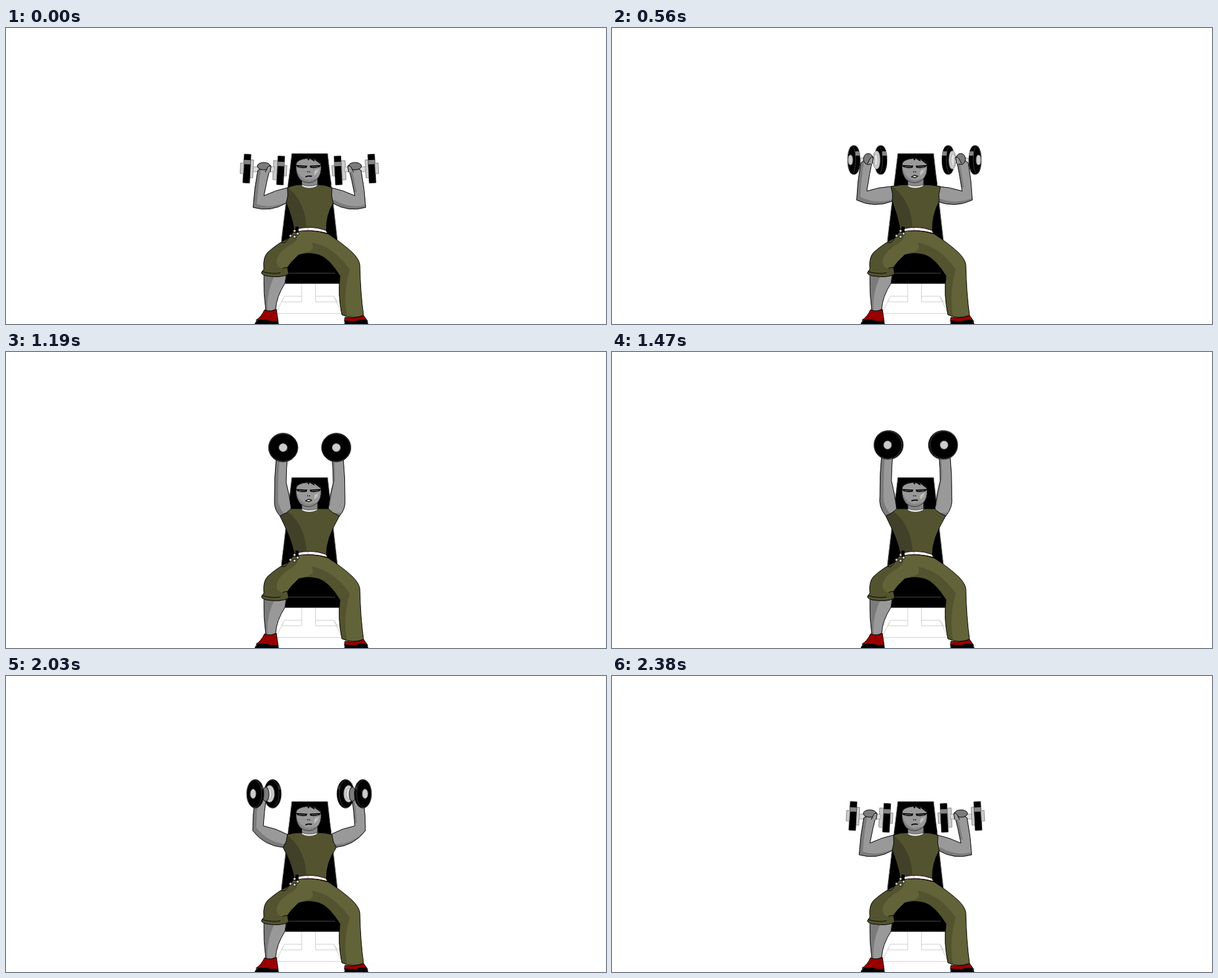
These frames come from a looping animation (970x480 px, 2.8 s). An HTML page with a canvas:

```html
<!DOCTYPE html>
<html lang="en">
<head>
<meta charset="utf-8">
<title>Seated dumbbell press</title>
<style>
html, body { margin: 0; width: 100%; height: 100%; overflow: hidden; background: #fff; }
canvas { display: block; width: 970px; height: 480px; }
</style>
</head>
<body>
<canvas id="stage" width="970" height="480"></canvas>
<script>
const c = document.getElementById('stage').getContext('2d');
const LOOP = 2800, STEP = 70, HOLD = 350, LAST = 29;

const SKIN = '#999', SKIN_DARK = '#7b7b7b';
const SHIRT = '#535330', SHIRT_DARK = '#414129';
const PANTS = '#636339', PANTS_DARK = '#535330';
const RED = '#990000';

// step, mirror axis, plate gap, plate width, front plate x, y, then the arm:
// shoulder, inner elbow, inner wrist, outer wrist, outer elbow, armpit
const rest = [0, 490.5, 54.5, 11, 389.5, 228, 455, 259, 417, 272, 428, 223, 407, 231, 399.5, 291, 453, 284];
const poses = [
  rest,
  [3, 489, 43.5, 20, 391, 214, 451, 257, 412, 264.5, 422, 209, 402, 219, 395.5, 279, 453, 281],
  [8, 492, 27.5, 29, 415.5, 177, 453, 254, 430, 224, 435, 182, 414, 190, 412, 236, 443, 276],
  [12, 491, 0, 47, 448, 155, 461, 254, 453, 212, 455, 170, 437, 170, 434, 240, 443, 266],
  [15, 491, 0, 47, 449, 149, 461, 254, 454, 208, 456, 164, 438, 164, 435, 236, 443, 265],
  [20, 492, 17, 33, 426.5, 165.5, 456, 255, 438, 218, 441, 178, 423, 180, 421, 226, 441, 271],
  [24, 490, 28, 28, 403, 191, 455, 257, 416, 243, 421, 196, 402, 204, 399, 251, 448, 278],
  rest.map((v, i) => i === 0 ? LAST : i > 4 && i % 2 ? v - 1 : v)
];

// cubic blend through the poses
function slope(n, i) {
  const a = poses[n - 1], b = poses[n + 1];
  return a && b ? (b[i] - a[i]) / (b[0] - a[0]) : 0;
}
function poseAt(k) {
  let n = 0;
  while (n < poses.length - 2 && k >= poses[n + 1][0]) n++;
  const a = poses[n], b = poses[n + 1], d = b[0] - a[0];
  const t = (k - a[0]) / d, t2 = t * t, t3 = t2 * t;
  return a.map((v, i) =>
    v * (2 * t3 - 3 * t2 + 1) + b[i] * (3 * t2 - 2 * t3) +
    d * (slope(n, i) * (t3 - 2 * t2 + t) + slope(n + 1, i) * (t3 - t2)));
}

function paint(path, fill, stroke, width = 1) {
  if (typeof path === 'string') path = new Path2D(path);
  if (fill) { c.fillStyle = fill; c.fill(path); }
  if (stroke) { c.strokeStyle = stroke; c.lineWidth = width; c.stroke(path); }
}
function clipped(path, draw) {
  c.save();
  c.clip(path);
  draw();
  c.restore();
}
function oval(x, y, rx, ry, fill, stroke, width) {
  const p = new Path2D();
  p.ellipse(x, y, rx, ry, 0, 0, 7);
  paint(p, fill, stroke, width);
}
// box whose corners grow until it is an ellipse
function softBox(x, y, rx, ry, round) {
  const p = new Path2D();
  p.roundRect(x - rx, y - ry, rx * 2, ry * 2, { x: rx * round, y: ry * round });
  return p;
}

function drawBench() {
  paint('M478 414V444H446L450 435H478M448 439L436 463H543L530 435H500.5M500.5 414V444H536L530 435', null, '#ccc');
  paint('M462 203.5H520L536 346H445Z', '#000', '#888');
  paint('M462 362H516L541 398L539 414.5H451L455 390Z', '#000', '#555');
  paint('M453 397.5H532', null, '#444');
}

function drawHead(open) {
  paint('M464 210Q490 199 518 210L526 254Q490 258 456 254Z', '#000');
  paint('M478 243H504V255Q490 262 478 255Z', '#888', '#000');
  const face = new Path2D('M469 222Q469 213 488 211.5Q508 212 509 222Q511 237 502 246Q489 256 476 246Q468 237 469 222Z');
  paint(face, SKIN);
  clipped(face, () => {
    paint('M466 230L471 231Q475 243 489 247L503 244L495 256H466Z', '#848484');
    paint('M474 209L487 212L489 215L491 212L499 216.5L498 213L510 222V206Z', '#000');
  });
  paint(face, null, '#222', .8);
  paint('M468 222.3L487 223.3L486 226.5Q479 228 472 226ZM491 223.3L510 222.3L506 226Q498 228 492 226.5Z', '#000');
  paint('M473 225H484M494 225H505', null, '#999', .8);
  paint('M487 233.3h1.5M490 233.3h1.5', null, '#000', 1.5);
  paint('M498 239L499 232L506 228L504 235Z', '#c4c4c4');
  paint('M500 240L505 230', null, SKIN, 1);
  if (open) paint('M484 241.5L489 238.7L494.5 240.3L490 242.8Z', '#ddd', '#000', 1.2);
  else paint('M484 241.5Q488 239.5 494.5 240.5', null, '#000', 1.8);
}

function drawPlate(x, y, g, front) {
  const { w, u, round } = g, left = x - w / 2;
  const turn = Math.pow(1 - u, 1.6), rim = Math.min(w, 12 * turn);
  const near = Math.min(1, u * 4), bulge = 12 * near * (1 - near);
  c.save();
  c.translate(x, y);
  c.rotate(.05 * (1 - near));
  c.translate(-x, -y);
  // collar on the far side
  if (u < .25) {
    paint(softBox(x + (front ? 7 : 6.5) * (1 - u * 2), y, 3.2, front ? 14.5 : 8.5, round * .6), '#ccc', '#888');
  }
  const body = softBox(x, y, w / 2, 23.3, round);
  paint(body, '#000', '#222', .7);
  clipped(body, () => {
    const band = new Path2D();
    band.rect(left + w - rim, y - 14, rim, 7);
    paint(band, u < .35 ? '#858585' : '#333');
  });
  if (round > .5) paint(softBox(left + (w - rim) / 2 + .5, y, (w - rim) / 2, 22.3, 1), null, '#555', .7);
  if (front) {
    const hx = x - 8 * Math.pow(1 - u, 1.3) - bulge;
    paint(softBox(hx, y, 2.6 + 4 * u + bulge / 3, 8.5 - 2 * u, round), '#ccc', '#888');
  } else {
    const hx = x - 9 * (1 - u), rx = Math.min(8, 3 + 10 * u), ry = 15.5 - 4 * u;
    paint(softBox(hx, y, rx, ry, round), '#ccc', '#888');
    if (u > .15) paint(softBox(hx - 1, y, rx * .6, ry * .65, round), '#e2e2e2', '#999', .8);
  }
  c.restore();
}

function armPath(p) {
  const [sx, sy, ix, iy, wx, wy, vx, vy, ex, ey, ax, ay] = p.slice(6);
  const a = new Path2D();
  a.moveTo(sx + 14, sy + 4);
  a.lineTo(sx, sy);
  a.quadraticCurveTo((sx + ix) / 2 + 1, (sy + iy) / 2 - 3, ix, iy);
  a.quadraticCurveTo((ix + wx) / 2 - 1, (iy + wy) / 2, wx, wy);
  a.quadraticCurveTo((wx + vx) / 2 + 4, wy - 2, vx, vy);
  a.quadraticCurveTo((vx + ex) / 2 - 2, (vy + ey) / 2, ex, ey);
  a.quadraticCurveTo((ex + ax) / 2 - (ay - ey) * .22, (ey + ay) / 2 + (ax - ex) * .22, ax, ay);
  a.lineTo(ax + 16, ay);
  a.closePath();
  return a;
}

function drawFist(x, y, near, wx, wy) {
  oval(x, y, 10.5 - 5.5 * near, 6 + 6 * near, SKIN_DARK, '#000');
  if (near > .8) return;
  const thumb = new Path2D();
  thumb.moveTo(wx - 1, wy + 11);
  thumb.lineTo(wx + .5, wy + 1);
  thumb.quadraticCurveTo(wx - 3, wy - 1, wx - 5, wy + 3);
  thumb.lineTo(wx - 9, wy + 11);
  paint(thumb, SKIN, '#000');
}

function drawArm(p, shade) {
  const [, , gap, width, x, y] = p, w = Math.min(47, width);
  const u = Math.max(0, (w - 11) / 36);
  const g = { w, u, round: Math.min(1, .04 + u * 3.4) };
  const drop = 3 * Math.max(0, 1 - u * 4), near = Math.min(1, u * 2);

  drawPlate(x + Math.max(0, gap), y + drop, g, false);
  if (u < .4) {
    const bar = new Path2D();
    bar.rect(x + 10, y - 3, gap - 20, 8);
    paint(bar, '#ddd', '#999');
  }
  const arm = armPath(p);
  paint(arm, SKIN_DARK);
  clipped(arm, () => {
    c.translate(shade, -5);
    paint(arm, SKIN);
  });
  paint(arm, null, '#000');
  drawFist(x + gap / 2 + 3 * near, y - 4 + 5 * near, near, p[10], p[11]);
  drawPlate(x, y, g, true);
}

function drawShirt(p) {
  const m = 982, [sx, sy] = p.slice(6, 8), [ax, ay] = p.slice(16);
  const hole = (sx + ax) / 2 + 3, mid = (sy + ay) / 2 + 1;
  const s = new Path2D();
  s.moveTo(478, 254);
  s.quadraticCurveTo(465, 254, sx, sy);
  s.quadraticCurveTo(hole, mid, ax, ay);
  s.quadraticCurveTo(461, 302, 466, 327);
  s.quadraticCurveTo(492, 320, 518, 329);
  s.quadraticCurveTo(517, 304, m - ax, ay);
  s.quadraticCurveTo(m - hole, mid, m - sx, sy);
  s.quadraticCurveTo(516, 254, 504, 254);
  s.quadraticCurveTo(490, 262, 478, 254);
  paint(s, SHIRT);
  clipped(s, () => paint('M436 250L456 259Q486 284 486 330H436Z', SHIRT_DARK));
  paint(s, null, '#000');
  paint('M478 254Q490 259 504 254L502 257Q490 262 479 257Z', '#fff', '#444', .7);
}

function drawLegs() {
  const shin = new Path2D('M417 400Q416 430 420 458Q428 461 436 456Q437 436 451 414L453 400Z');
  paint(shin, SKIN);
  clipped(shin, () => paint('M410 398H436Q420 428 423 462H410Z', SKIN_DARK));
  paint(shin, null, '#000');

  paint('M404 474Q413 468 418 457Q428 461 437 456L440 476Z', RED, '#000');
  paint('M548 469Q562 472 578 466L585 476H547Z', RED, '#000');
  paint('M402 480Q403 474 412 473Q420 472 427 475L440 475L441 480ZM547 480L548 474Q558 476 566 475Q576 471 583 474L586 480Z', '#000');

  const pants = new Path2D('M464 331Q492 325 521 334Q545 350 560 364Q571 375 572 384Q573 430 578 466Q560 473 543 465Q536 432 540 402Q522 373 506 368Q488 363 473 368Q462 378 455 388L457 399Q445 406 421 402Q410 399 414 395L417 391Q415 372 423 364Q438 350 458 340Z');
  paint(pants, PANTS);
  clipped(pants, () => {
    paint('M466 330L400 360V410H460L457 388L446 390Q435 386 438 375Q443 360 463 350Q474 342 472 330Z', PANTS_DARK);
    paint('M494 348Q530 354 556 392Q544 428 552 472H530V400L494 368L482 364Q502 362 494 348Z', PANTS_DARK);
  });
  paint(pants, null, '#000');
  paint('M414 395Q432 400 444 397M447 390Q452 387 456 389M445 348L451 348L458 340', null, '#000');

  paint('M466 327Q492 319 517 328L520 333Q492 325 466 331Z', '#fff', '#200', 1);
  paint('M486 324H490V328H486Z', '#ddd');
  paint('M468 322H473V332H468Z', '#000');
  for (const [x, y] of [[460, 337], [466.5, 338.5], [471.5, 333.5], [466.5, 329]]) {
    oval(x, y, 2.3, 2.3, '#ccc', '#000', .9);
  }
}

function draw(time) {
  const k = Math.max(0, Math.min(LAST, Math.floor((time % LOOP - HOLD) / STEP + 1e-6)));
  const p = poseAt(k);
  c.fillStyle = '#fff';
  c.fillRect(0, 0, 970, 480);
  c.lineJoin = 'round';
  drawBench();
  drawHead(k > 0 && k < 16);
  drawArm(p, 6);
  c.save();
  c.transform(-1, 0, 0, 1, 2 * p[1], 0);
  drawArm(p, -3);
  c.restore();
  drawShirt(p);
  drawLegs();
}

const start = performance.now();
function tick() {
  draw(performance.now() - start);
  requestAnimationFrame(tick);
}
tick();
</script>
</body>
</html>
```
